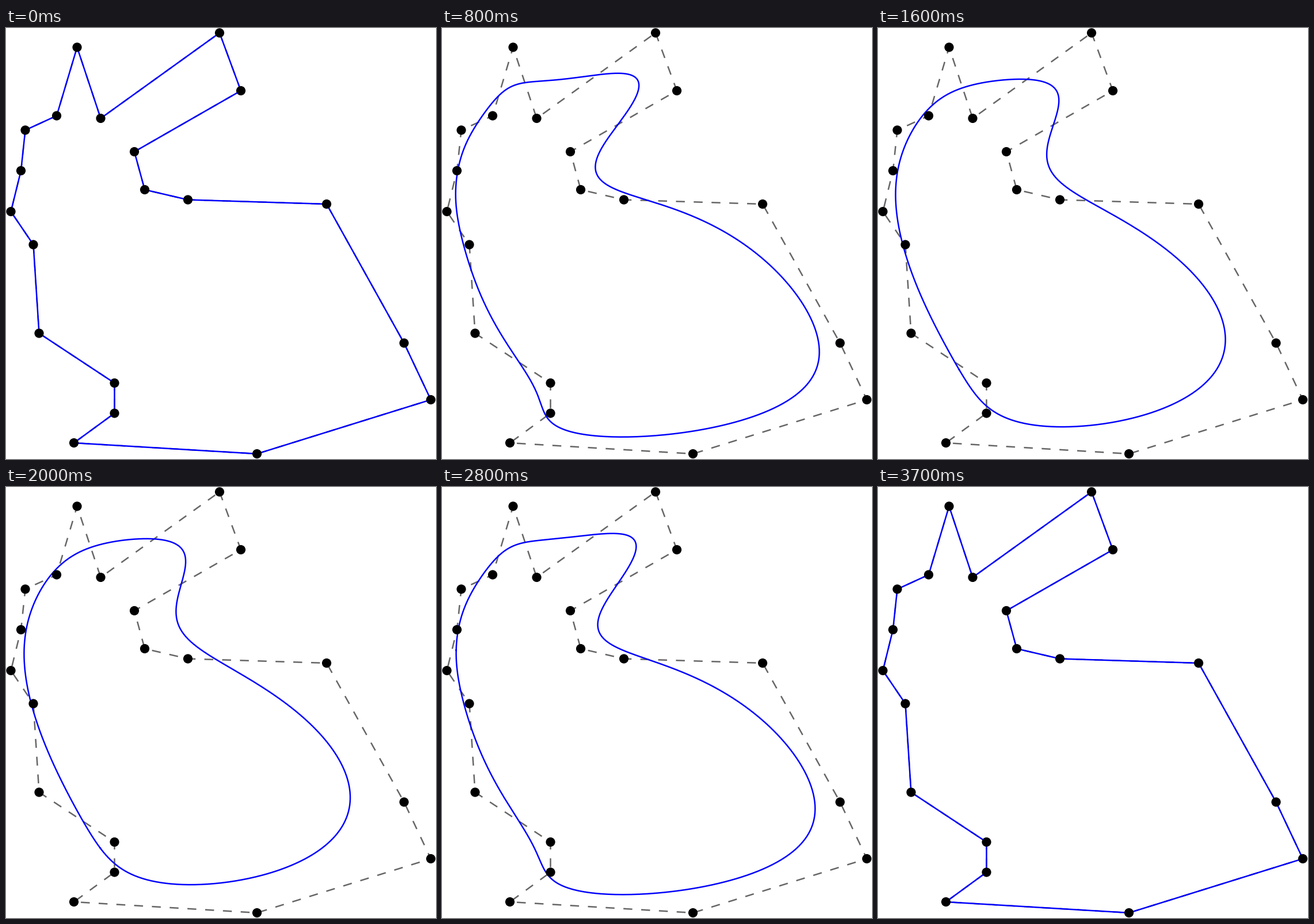
Recreate the animation shown at these times as a matplotlib script. Size 747 px wide and 749 px high, loop 3800 ms.

```python
import numpy as np
import matplotlib.pyplot as plt
from matplotlib.animation import FuncAnimation
from matplotlib.patches import Circle

W, H, DPI = 747, 749, 64
STEPS = 19              # spline degrees 1..19, then back down
SAMPLES = 40            # curve samples per span
LINE, RADIUS, DASH = 2.5, 8.1, 15.45

# Control polygon in pixels
POINTS = np.array([
    (371, 8.5), (408, 109), (223, 215), (241, 281), (316, 298.5),
    (557, 306), (691.5, 547.5), (738, 646), (436, 740), (118, 721),
    (188.5, 669.5), (188.5, 617), (57.5, 530.5), (47.5, 376.5), (8.5, 319),
    (26, 248), (33.5, 177.5), (88, 152.5), (123.5, 33.5), (164.5, 157)])


def px(size):
    """Pixels to points."""
    return size * 72 / DPI


def closed(points):
    return np.vstack([points, points[:1]])


def basis(degree, u):
    """Uniform B-spline values at u, u + 1, ... u + degree."""
    b = [np.ones_like(u)]
    for p in range(1, degree + 1):
        zero = [np.zeros_like(u)]
        left, right = b + zero, zero + b
        b = [((u + j) * left[j] + (p + 1 - u - j) * right[j]) / p
             for j in range(p + 1)]
    return b


def spline(degree):
    """Closed uniform B-spline of the control polygon."""
    u = np.linspace(0, 1, SAMPLES, endpoint=False)
    curve = sum(np.roll(POINTS, j, axis=0)[:, None] * b[None, :, None]
                for j, b in enumerate(basis(degree, u)))
    return closed(curve.reshape(-1, 2))


fig = plt.figure(figsize=(W / DPI, H / DPI), dpi=DPI, facecolor="white")
ax = fig.add_axes([0, 0, 1, 1])
ax.set(xlim=(0, W), ylim=(H, 0))
ax.axis("off")

ax.plot(*closed(POINTS).T, color="0.4", lw=px(LINE),
        ls=(0, (DASH / LINE, DASH / LINE)))
curve, = ax.plot([], [], color="blue", lw=px(LINE))
for point in POINTS:
    ax.add_patch(Circle(point, RADIUS, color="black", lw=0, zorder=3))

CURVES = [spline(d) for d in range(1, STEPS + 1)]


def update(i):
    curve.set_data(*CURVES[min(i, 2 * STEPS - 1 - i)].T)
    return curve,


anim = FuncAnimation(fig, update, frames=2 * STEPS, interval=100,
                     repeat=True, repeat_delay=0)
plt.show()
```
